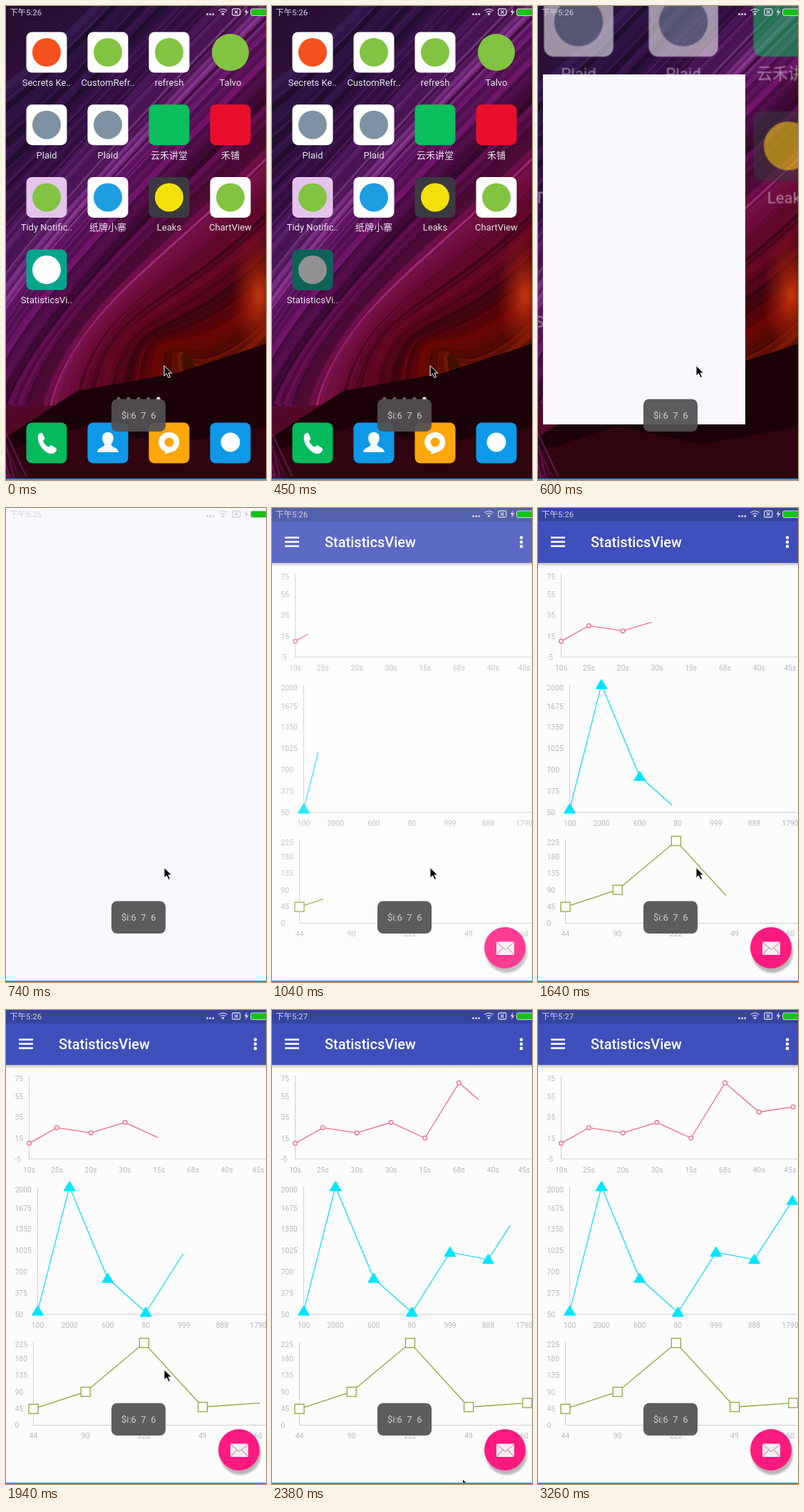
Write an HTML page that moves like this. It is 365 px wide and 665 px high and loops after 3360 ms.

```html
<!DOCTYPE html>
<html lang="zh">
<head>
<meta charset="utf-8">
<title>StatisticsView</title>
<style>
html, body { margin: 0; width: 100%; height: 100%; overflow: hidden; background: #000; }
svg { display: block; width: 100vw; height: 100vh; }
text { font-family: Roboto, "Noto Sans CJK SC", "Noto Sans CJK", sans-serif; white-space: pre; }
</style>
</head>
<body>
<svg viewBox="0 0 365 665" preserveAspectRatio="none">
  <defs>
    <linearGradient id="sky" x2=".4" y2="1">
      <stop offset="0" stop-color="#241033"/>
      <stop offset=".5" stop-color="#480d42"/>
      <stop offset="1" stop-color="#5c0512"/>
    </linearGradient>
    <radialGradient id="ember">
      <stop offset="0" stop-color="#d0400a" stop-opacity=".85"/>
      <stop offset="1" stop-color="#b01808" stop-opacity="0"/>
    </radialGradient>
    <linearGradient id="drop" x2="0" y2="1">
      <stop offset="0" stop-opacity=".25"/>
      <stop offset="1" stop-opacity="0"/>
    </linearGradient>
    <filter id="soft" x="-30%" y="-30%" width="160%" height="160%"><feGaussianBlur stdDeviation="1.8"/></filter>
  </defs>
  <g id="wall">
    <rect width="365" height="665" fill="url(#sky)"/>
    <g id="streaks" fill="none"></g>
    <ellipse cx="355" cy="405" rx="40" ry="90" fill="url(#ember)"/>
    <path d="M0 605L100 540 240 515 365 474V665H0z" fill="#1a0208"/>
    <path d="M0 625L110 590 230 615 365 590V665H0z" fill="#30040f"/>
    <g id="glints" stroke="#6a1658" stroke-width="2.5"></g>
  </g>
  <g id="home"></g>
  <rect id="blank" fill="#faf8fe"/>
  <g id="app">
    <rect width="365" height="665" fill="#fcfcfd"/>
    <g id="charts"></g>
    <rect y="77" width="365" height="5" fill="url(#drop)"/>
    <rect width="365" height="77" fill="#3f4fbb"/>
    <rect width="365" height="19" fill="#35449f"/>
    <path d="M18 41.5h20m-20 6h20m-20 6h20" stroke="#fff" stroke-width="2.3"/>
    <text x="74" y="55" font-size="20" font-weight="500" fill="#fff">StatisticsView</text>
    <path d="M350 41.5v14" stroke="#fff" stroke-width="4.6" stroke-linecap="round" stroke-dasharray="0 6.2"/>
    <circle cx="329" cy="623" r="29" opacity=".28" filter="url(#soft)"/>
    <circle cx="327" cy="617" r="29" fill="#ff1a7f"/>
    <g transform="translate(315 608.5)">
      <rect width="25" height="18.5" rx="1.5" fill="#f3eef0"/>
      <path d="M.5 1l12 10 12 -10M.5 18l8.500 -9.500M24.500 18l-8.500 -9.500" fill="none" stroke="#c9a3b2" stroke-width="1.2"/>
    </g>
  </g>
  <rect id="veil" width="365" height="665" fill="#fdfaff"/>
  <g fill="#d3d0dc">
    <text id="clock" x="5" y="13" font-size="11.5"></text>
    <g fill="none" stroke="#d3d0dc" stroke-width="1.3">
      <path d="M282.500 11.500h9" stroke-width="3" stroke-linecap="round" stroke-dasharray="0 4.1"/>
      <path d="M298.500 6.500q6 -4.800 12 0M300.700 8.800q3.800 -3 7.600 0"/>
      <rect x="317.700" y="4" width="11" height="9" rx="2"/>
      <path d="M321 6.300l4.500 4.500m0 -4.500l-4.500 4.500"/>
    </g>
    <circle cx="304.500" cy="11.300" r="1.700"/>
    <path d="M338.500 3l-4 6h2.600l-1.200 5 4.600 -6.500h-2.800z"/>
    <rect x="343.500" y="4" width="26" height="9.500" rx="2.500" fill="#14c316" stroke="#d3d0dc"/>
  </g>
  <rect x="148" y="551.5" width="76" height="45.500" rx="8" fill="#525053" fill-opacity=".93"/>
  <text x="162" y="579" font-size="13" fill="#d0ced1">$i:6  7  6</text>
  <path id="cursor" d="M0 0v14.500l3.500 -3.200 2.600 5.700 2.500 -1.200 -2.600 -5.400h4.600z" stroke="#fff"/>
  <rect y="663" width="365" height="2" fill="#16a3dc"/>
</svg>
<script>
const LOOP = 3360;
const $ = id => document.getElementById(id);
const show = (el, on) => el.setAttribute("visibility", on ? "visible" : "hidden");

function add(parent, tag, attrs, text) {
  const el = document.createElementNS("http://www.w3.org/2000/svg", tag);
  for (const k in attrs) el.setAttribute(k, attrs[k]);
  if (text !== undefined) el.textContent = text;
  parent.appendChild(el);
  return el;
}

// Wallpaper: one family of curves, from purple (k = 0) to red (k = 1).
let seed = 17;
const rnd = () => (seed = (seed * 16807) % 2147483647) / 2147483647;
const bump = (k, mid, width) => Math.exp(-(((k - mid) / width) ** 2));

function streak(k) {
  const x = -10 + 500 * Math.max(0, k - 0.55), y = 120 + 800 * Math.min(k, 0.55);
  const endY = 660 * k - 260 + 12 * rnd();
  const glow = (bump(k, 0.36, 0.09) + bump(k, 0.7, 0.035)) * rnd();
  const hue = 270 + 92 * k ** 1.4, sat = 50 + 42 * k - 25 * glow;
  const light = 10 + 15 * rnd() + 26 * glow;
  add($("streaks"), "path", {
    d: `M${x} ${y}C${x + 110 * (1 - k)} ${y - 70 - 90 * k} 225 ${endY + 150} 375 ${endY}`,
    stroke: `hsl(${hue} ${sat}% ${light}%)`, "stroke-width": 3 + 10 * rnd() * (1 - glow), opacity: 0.8
  });
}

function buildWall() {
  for (let k = 0; k < 1.1; k += 0.008) streak(k);
  for (let y = 600; y < 665; y += 8)
    add($("glints"), "path", { d: `M0 ${y}l${10 + 30 * rnd()} 60`, opacity: 0.3 + 0.6 * rnd() });
}

// Home screen
const colX = i => 57 + 86 * i, rowY = j => 65 + 101.7 * j;
const GREEN = "#82c341", STEEL = "#7d93a3", BLUE = "#0d99e8";
const APPS = [
  ["Secrets Ke..", "#fff", "#f4511e"], ["CustomRefr..", "#fff", GREEN], ["refresh", "#fff", GREEN], ["Talvo", "none", GREEN],
  ["Plaid", "#fff", STEEL], ["Plaid", "#fff", STEEL], ["云禾讲堂", "#0bbf5c", "none"], ["禾铺", "#e90f2c", "none"],
  ["Tidy Notific..", "#e4c4ea", GREEN], ["纸牌小寨", "#fff", "#1c9ee0"], ["Leaks", "#3b3a40", "#f4e10c"], ["ChartView", "#fff", GREEN],
  ["StatisticsVi..", "#05a58c", "#fff"]
];
const DOCK = [
  ["#05b95d", "M-12 -11q4 -6 7 -1l2 5q1 2 -2 4 2 6 8 9 3 -4 5 -2l5 3q3 3 -2 7 -7 4 -16 -5 -9 -10 -7 -20z"],
  [BLUE, "M0 -15c10 0 9 12 4.500 17 0 4 10 4 10.500 11h-30c.5 -7 10.500 -7 10.500 -11 -4.500 -5 -5.500 -17 4.500 -17z"],
  ["#ffa60b", "M0 -15a14 14 0 0 1 4 27.500l-10 3.500v-4a14 14 0 0 1 6 -27zm0 7.500a6.500 6.500 0 0 0 0 13a6.500 6.500 0 0 0 0 -13z"],
  [BLUE, "M0 -14.500a13.500 13.500 0 0 0 0 27a13.500 13.500 0 0 0 0 -27z"]
];

const tile = (x, y, fill) => add($("home"), "rect", { x: x - 28.5, y: y - 28.5, width: 57, height: 57, rx: 8, fill });

function buildHome() {
  const home = $("home");
  APPS.forEach(([name, back, mark], i) => {
    const x = colX(i % 4), y = rowY(i >> 2);
    tile(x, y, back);
    add(home, "circle", { cx: x, cy: y, r: back === "none" ? 26 : 20, fill: mark });
    add(home, "text", { x, y: y + 47, "font-size": 13, fill: "#e9e4ee", "text-anchor": "middle" }, name);
  });
  for (let i = 0; i < 5; i++)
    add(home, "circle", { cx: 158 + i * 14, cy: 551, r: 2.6, fill: "#fff", opacity: i === 4 ? 1 : 0.35 });
  DOCK.forEach(([fill, d], i) => {
    tile(colX(i), 613, fill);
    add(home, "path", { d, fill: "#fff", transform: `translate(${colX(i)} 613)` });
  });
  const shade = tile(colX(0), rowY(3), "#1b1b1f");
  shade.setAttribute("opacity", 0.48);
  return shade;
}

// Charts: values scaled between min and max; side labels every `tick`.
const circle = (g, x, y, stroke) => add(g, "circle", { cx: x, cy: y, r: 2.8, fill: "#fff", stroke, "stroke-width": 1.3 });
const square = (g, x, y, stroke) =>
  add(g, "rect", { x: x - 6.5, y: y - 6.5, width: 13, height: 13, fill: "#fff", stroke, "stroke-width": 1.3 });
const triangle = (g, x, y) => add(g, "path", {
  d: `M${x} ${y - 7}l7.5 12.5h-15z`, fill: "#00e5ff", stroke: "#00e5ff", "stroke-width": 1.5, "stroke-linejoin": "round"
});

const CHARTS = [
  { color: "#ef7085", mark: circle, unit: "s", x: 32.5, step: 47.8, top: 92, base: 209, min: -5, max: 75, tick: 20,
    values: [10, 25, 20, 30, 15, 68, 40, 45] },
  { color: "#16dff2", mark: triangle, unit: "", x: 44.5, step: 53.6, top: 248, base: 427, min: 50, max: 2000, tick: 325,
    values: [100, 2000, 600, 80, 999, 888, 1790] },
  { color: "#8ea83a", mark: square, unit: "", x: 38.5, step: 82.2, top: 465.5, base: 582.5, min: 0, max: 225, tick: 45,
    values: [44, 90, 222, 49, 60] }
];

function buildChart(ch) {
  const g = add($("charts"), "g", {});
  const toY = v => ch.base - (v - ch.min) / (ch.max - ch.min) * (ch.base - ch.top);
  const label = (x, y, text, anchor) =>
    add(g, "text", { x, y: y + 3.8, "font-size": 10.4, fill: "#b9b9bd", "text-anchor": anchor }, text);

  add(g, "path", { d: `M${ch.x} ${ch.top}V${ch.base}H365`, fill: "none", stroke: "#cfcfd2" });
  for (let v = ch.min; v <= ch.max; v += ch.tick) label(12.5, Math.max(toY(v), ch.top + 4), v, "start");
  ch.pts = ch.values.map((v, i) => [Math.max(ch.x, ch.x - 9 + i * ch.step), toY(v)]);
  ch.values.forEach((v, i) => label(Math.min(ch.pts[i][0], 354), ch.base + 15, v + ch.unit, "middle"));
  ch.line = add(g, "polyline", { fill: "none", stroke: ch.color, "stroke-width": 1.3 });
  ch.marks = ch.pts.map(([x, y]) => ch.mark(g, x, y, ch.color));
}

function drawChart(ch, p) {
  const end = ch.pts.length - 1, q = Math.min(p, end), i = Math.floor(q);
  const path = ch.pts.slice(0, i + 1);
  if (i < end) path.push(ch.pts[i].map((v, j) => v + (ch.pts[i + 1][j] - v) * (q - i)));
  ch.line.setAttribute("points", path.join(" "));
  ch.marks.forEach((m, j) => show(m, j <= q));
}

// Points passed by the lines; each pose is held for about 148 ms.
function progress(t) {
  const k = Math.floor((t - 1040) / 148.3);
  return 0.46 + k * (0.62 - 0.0057 * k);
}

function render(t) {
  const zoom = t >= 600, full = t >= 740, open = t >= 1040;
  $("home").setAttribute("transform", zoom ? "translate(57 370) scale(1.71) translate(-57 -370)" : "");
  $("home").setAttribute("opacity", zoom ? 0.55 : 1);
  show($("home"), !full);
  show(shade, t >= 450 && !full);

  const box = full ? [0, 0, 365, 665] : [7, 96, 284, 491];
  ["x", "y", "width", "height"].forEach((k, i) => $("blank").setAttribute(k, box[i]));
  show($("blank"), zoom && !open);

  $("app").setAttribute("display", open ? "inline" : "none");
  $("veil").setAttribute("opacity", open && t < 1190 ? 0.15 : 0);
  if (open) CHARTS.forEach(ch => drawChart(ch, progress(t)));

  $("clock").textContent = t < 2230 ? "下午5:26" : "下午5:27";
  $("cursor").setAttribute("transform", t < 2380 ? "translate(222 504.5)" : "translate(267.5 658)");
  show($("cursor"), t < 2970);
}

buildWall();
const shade = buildHome();
CHARTS.forEach(buildChart);

const start = performance.now();
function tick() {
  render((performance.now() - start) % LOOP);
  requestAnimationFrame(tick);
}
tick();
</script>
</body>
</html>
```
